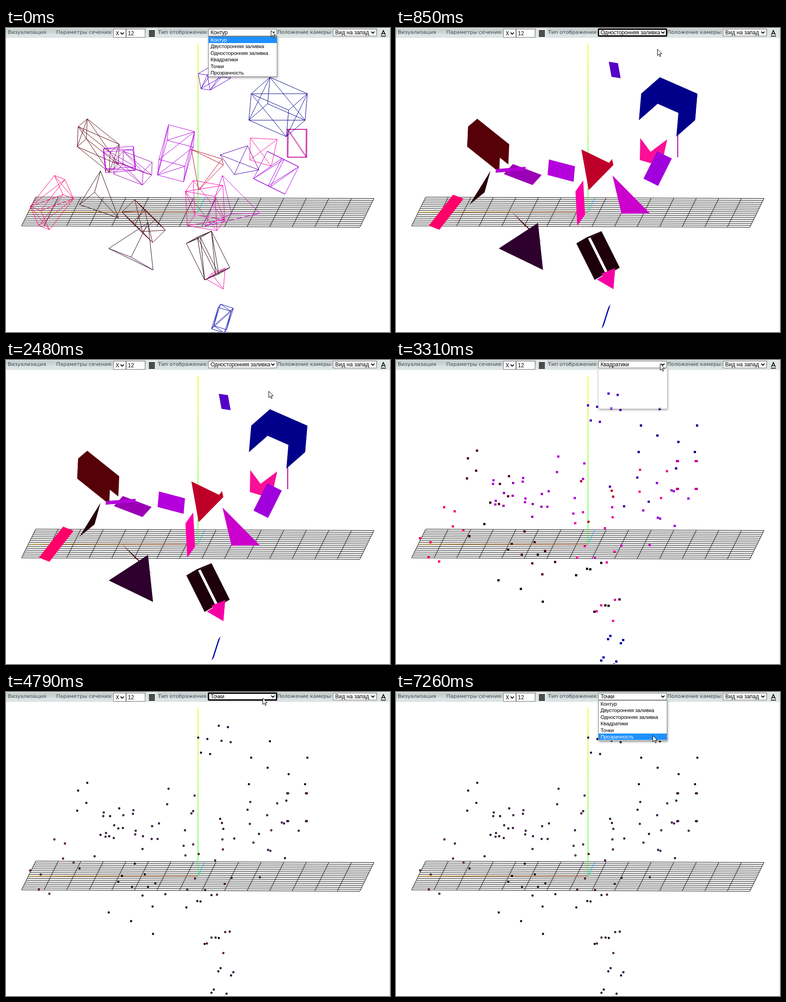
Recreate the animation shown at these times as an HTML page with a canvas. Size 841 by 666 pixels, loop 8 s.

```html
<!DOCTYPE html>
<html lang="ru">
<head>
<meta charset="utf-8">
<title>Визуализация</title>
<style>
html, body { margin: 0; width: 100%; height: 100%; overflow: hidden; background: #fff; }
#stage { position: relative; width: 841px; height: 666px; overflow: hidden; background: #fff; }
#stage > * { position: absolute; box-sizing: border-box; }
canvas { left: 0; top: 0; }
.bar { left: 0; top: 0; width: 841px; height: 22px; border-bottom: 1px solid #e6eaea;
  background: linear-gradient(#f2f4f4 0 1px, #c5cccc 1px, #ccd3d3 10px, #dbe2e2 13px, #dde4e4); }
.edge { right: 0; top: 0; width: 1px; height: 666px; background: #d2d6d6; }
.label { top: 1px; font: 11.3px/17px "DejaVu Sans", Verdana, sans-serif; color: #3c5058; white-space: pre; }
.field { background: #fff; border: 1px solid #767676; color: #000; white-space: pre;
  font: 12px/14px "Liberation Sans", Arial, sans-serif; padding-left: 4px; }
.field svg { position: absolute; right: 3px; top: 50%; margin-top: -3px; }
.field path { fill: none; stroke: #000; stroke-width: 1.8; }
.tall { top: 2px; height: 19px; line-height: 18px; }
.btn { top: 1px; height: 20px; background: #dfe5e5; }
#kind { left: 443px; top: 2px; width: 150px; height: 16px; letter-spacing: -.2px; }
#kind.ring { box-shadow: 0 0 0 1px #000, inset 0 0 0 1px #000; border-color: #000; border-radius: 1px; }
#menu { left: 443px; top: 18px; width: 151px; height: 89px; background: #fff; border: 1px solid #8a8a8a;
  box-shadow: 1px 2px 5px rgba(0,0,0,.4); color: #000;
  font: 11.5px/14.4px "Liberation Sans", Arial, sans-serif; letter-spacing: -.15px; }
#menu.empty { background: none; border-color: #e8e8e8; }
#menu.empty div { visibility: hidden; }
#menu div { height: 14.4px; padding-left: 4px; white-space: pre; }
#menu .on { background: #1e90ff; color: #fff; }
#cursor { left: 0; top: 0; overflow: visible; }
</style>
</head>
<body>
<div id="stage">
  <canvas id="view" width="841" height="666"></canvas>
  <div class="bar"></div>
  <div class="edge"></div>
  <div class="label" style="left:4px">Визуализация</div>
  <div class="label" style="left:110px">Параметры сечения:</div>
  <div class="field tall" style="left:235px;width:28px">X<svg width="9" height="6"><path d="M1 1l3.5 3.5L8 1"/></svg></div>
  <div class="field tall" style="left:263px;width:42px;padding-left:3px">12</div>
  <div class="btn" style="left:307px;width:25px"></div>
  <svg style="left:312px;top:5px" width="15" height="14" shape-rendering="crispEdges"><path d="M1 1h13M1 4h13M1 7h13M1 10h13M1 13h13" stroke="#000" stroke-width="2"/></svg>
  <div class="label" style="left:333px">Тип отображения:</div>
  <div class="field" id="kind"><span></span><svg width="9" height="6"><path d="M1 1l3.5 3.5L8 1"/></svg></div>
  <div class="label" style="left:594px">Положение камеры:</div>
  <div class="field" style="left:716px;top:2px;width:96px;height:16px">Вид на запад<svg width="9" height="6"><path d="M1 1l3.5 3.5L8 1"/></svg></div>
  <div class="btn" style="left:814px;width:26px"></div>
  <svg style="left:820px;top:4px" width="13" height="15"><path d="M2 11.5L6.5 1.5L11 11.5M3.5 8.2h6M1 14h11" fill="none" stroke="#000" stroke-width="1.6"/></svg>
  <div id="menu"></div>
  <svg id="cursor" width="12" height="18"><path d="M.5 .5V14.3L3.8 11.3L6 16.6L8 15.8L5.8 10.6H10.3Z" fill="#fff" stroke="#000"/></svg>
</div>
<script>
const $ = id => document.getElementById(id);
const g = $('view').getContext('2d');
const LOOP = 8000;
const kinds = ['Контур', 'Двусторонняя заливка', 'Односторонняя заливка', 'Квадратики', 'Точки', 'Прозрачность'];
const CONTOUR = 0, ONE_SIDED = 2, SQUARES = 3, DOTS = 4;

// ---- solids ----
const solids = [];
const solid = (color, pts, edges, faces) =>
  solids.push({ color, pts, edges: edges.split(' '), faces: faces ? faces.split(' ') : [] });

// A corner and three edge vectors; vertex bits: 1 = a, 2 = b, 4 = c.
// Bits of flip turn the face diagonals.
function box(color, o, a, b, c, faces, flip = 0) {
  const corner = i => [0, 1].map(k => o[k] + (i & 1) * a[k] + (i >> 1 & 1) * b[k] + (i >> 2) * c[k]);
  const diagonals = [['03 47', '12 56'], ['14 36', '05 27'], ['06 17', '24 35']].map((d, i) => d[flip >> i & 1]);
  solid(color, [...Array(8).keys()].map(corner),
    '01 23 45 67 02 13 46 57 04 15 26 37 ' + diagonals.join(' '), faces);
}
const tetra = (color, a, b, c, d, faces) => solid(color, [a, b, c, d], '01 02 03 12 13 23', faces);

box('#5500c8', [466, 74], [20, 3], [-45, 26], [6, 33], '0154');
box('#be0096', [616, 222], [2, 0], [41, 0], [0, 61], '0154');
box('#00008a', [537, 144], [41, -36], [82, 36], [-5, 58], '0154 1375 2376 0132');
box('#560008', [158, 216], [20, -17], [70, 56], [-2, 44], '0264 1375 0132 0154');
box('#9b00b4', [257, 270], [-20, 22], [63, 24], [-1, 28], '4576');
box('#b400d8', [214, 264], [-1, 8], [65, -5], [5, 45], '4576');
box('#b400dc', [356, 212], [57, 15], [-21, 76], [-3, 34], '2376', 1);
box('#ff0069', [106, 323], [23, 9], [19, 42], [-53, 68], '2376', 4);
tetra('#280008', [207, 313], [194, 360], [161, 387], [246, 416], '012');
box('#500008', [282, 376], [-28, 27], [45, 43], [22, 24], '1375');
tetra('#2d002d', [311, 427], [225, 483], [322, 530], [274, 502], '012');
tetra('#be0028', [406, 266], [473, 287], [476, 300], [422, 355], '023 123');
tetra('#4b00a5', [529, 258], [469, 278], [500, 321], [554, 311], '');
tetra('#fa0f96', [535, 241], [594, 244], [534, 289], [581, 303], '023 123');
box('#a000dc', [572, 270], [32, 16], [37, 18], [-30, 60], '0154', 4);
box('#fa00aa', [410, 334], [-17, 24], [65, 11], [4, 75], '0154', 1);
tetra('#cc00cc', [474, 323], [556, 406], [494, 407], [436, 434], '012');
box('#1e000a', [395, 472], [24, -14], [31, -13], [40, 80], '0154 2376 0132', 4);
tetra('#f500a5', [480, 526], [450, 538], [440, 551], [476, 572], '023 013');
box('#0000aa', [470, 605], [-5, 7], [28, 9], [-15, 47], '0154', 4);

// ---- drawing ----
function trace(pts) {
  g.beginPath();
  pts.forEach(p => g.lineTo(...p));
}
function line(from, to, style, width = 1) {
  g.strokeStyle = style;
  g.lineWidth = width;
  trace([from, to]);
  g.stroke();
}
function grid(n) {
  const at = (u, v) => [65 + 741 * u - 31 * v, 370.5 + 3 * u + 63 * v];
  for (let i = 0; i <= n; i++) {
    line(at(i / n, 0), at(i / n, 1), '#000');
    line(at(0, i / n), at(1, i / n), '#000');
  }
}
function axis(to, near, far, width) {
  const from = [420.5, 403.5];
  const fade = g.createLinearGradient(...from, ...to);
  fade.addColorStop(0, near);
  fade.addColorStop(1, far);
  line(from, to, fade, width);
}

const painters = {
  [CONTOUR](s) {
    for (const [i, j] of s.edges) line(s.pts[i], s.pts[j], s.color);
  },
  [ONE_SIDED](s) {
    for (const face of s.faces) {
      trace([...face].map(i => s.pts[i]));
      g.fill();
    }
  },
  [SQUARES](s) {
    for (const [x, y] of s.pts) g.fillRect(Math.floor(x - 2.5), Math.floor(y - 2.5), 5, 5);
  },
  [DOTS](s) {
    g.strokeStyle = '#000';
    g.lineWidth = 1.2;
    for (const [x, y] of s.pts) {
      g.beginPath();
      g.arc(x, y, 1.8, 0, 7);
      g.fill();
      g.stroke();
    }
  }
};

function paint(mode) {
  g.clearRect(0, 0, 841, 666);
  grid(15);
  axis([50, 403.5], '#ff7848', '#f0b400', 1.2);
  axis([435.5, 372], '#20d0c0', '#30a0ff', 1.2);
  axis([420.5, 34], '#30ff50', '#eeff00', 1.5);
  for (const s of solids) {
    g.fillStyle = s.color;
    painters[mode](s);
  }
}

// ---- timeline ----
const TICK = 135;
const ROW = 14.4, MENU_TOP = 19;

// Each visit to the menu: when it opens and closes, and when the choice takes effect.
const visits = [
  { open: -120, close: 850, apply: 850, choice: ONE_SIDED },
  { open: 1390, close: 2480, apply: 2600, choice: SQUARES },
  { open: 3310, close: 4370, apply: 4490, choice: DOTS },
  { open: 6190, close: LOOP, apply: LOOP }
];

// Pointer strokes: first step, last step, where they lead.
const strokes = [
  [150, 420, 573, 49], [850, 850, 572, 46], [970, 1240, 580, 9], [1660, 2170, 575, 68],
  [2600, 2600, 576, 59], [2750, 3030, 578, 8], [3550, 4100, 557, 79], [4640, 4790, 562, 13],
  [6960, 6960, 562, 20], [7110, 7260, 562, 95]
];

function pointer(t) {
  let x = 580, y = 5;
  for (const [first, last, tx, ty] of strokes) {
    if (t < first) break;
    const gaps = Math.round((last - first) / TICK);
    const done = gaps ? Math.min(gaps, Math.floor((t - first) / (last - first) * gaps)) : 0;
    const left = 1 - (done + 1) / (gaps + 1);
    const ease = 1 - left * left;
    x += (tx - x) * ease;
    y += (ty - y) * ease;
  }
  return [x, y];
}

const menu = $('menu'), kind = $('kind'), cursor = $('cursor');
for (const name of kinds) {
  const row = document.createElement('div');
  row.textContent = name;
  menu.append(row);
}
let shown = -1;

function frame() {
  const t = performance.now() % LOOP;
  const [x, y] = pointer(t);
  const visit = visits.findLast(v => v.open <= t);
  const applied = visits.findLast(v => v.apply <= t);
  const mode = applied ? applied.choice : CONTOUR;
  const row = y < MENU_TOP ? mode : Math.floor((y - MENU_TOP) / ROW);

  cursor.style.transform = `translate(${Math.round(x)}px,${Math.round(y)}px)`;
  menu.style.display = t < visit.close ? 'block' : 'none';
  menu.className = t < visit.open + 120 ? 'empty' : '';
  [...menu.children].forEach((el, i) => el.className = i === row ? 'on' : '');
  kind.classList.toggle('ring', t >= visit.apply);
  if (mode !== shown) {
    shown = mode;
    kind.firstChild.textContent = kinds[mode];
    paint(mode);
  }
  requestAnimationFrame(frame);
}
frame();
</script>
</body>
</html>
```
